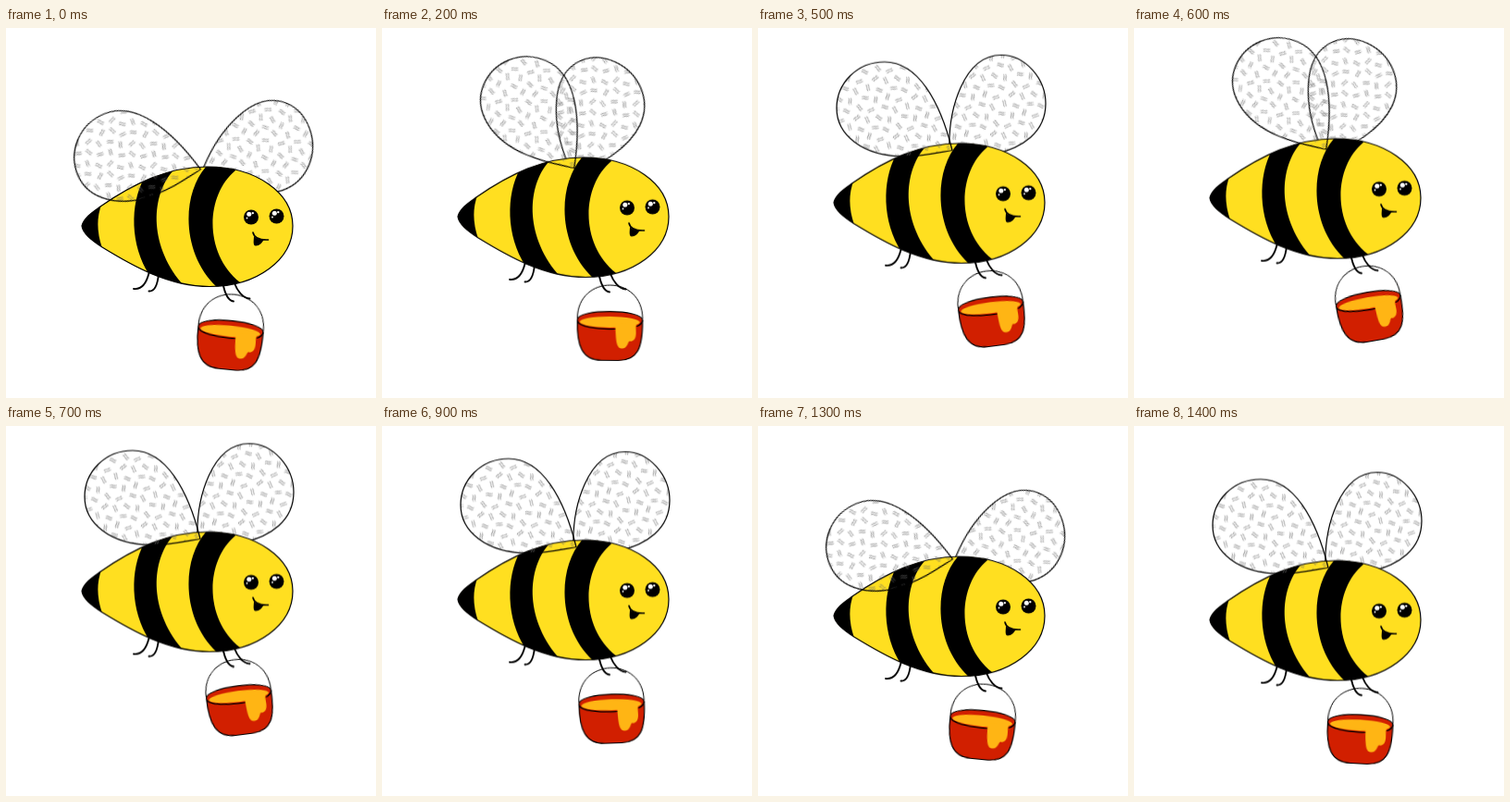
An HTML page without scripts for the animation above (1500 ms loop, 400 by 400 pixels).

```html
<!DOCTYPE html>
<html lang="en">
<head>
<meta charset="utf-8">
<title>Bee with a honey bucket</title>
<style>
  html, body { margin: 0; width: 100%; height: 100%; overflow: hidden; background: #fff; }
  svg { display: block; width: 100vw; height: 100vh; }
  .line { fill: none; stroke: #000; stroke-linecap: round; stroke-linejoin: round; }
  .thin { stroke-width: 1.2; }
  .bold { stroke-width: 1.9; }

  .bee, .wing, .bucket { animation: 1.5s infinite; }
  .bee { animation-name: hover; }
  .wing { --side: 1; animation-name: flap; animation-timing-function: step-end; }
  .wing.left { transform-origin: 198.5px 154px; }
  .wing.right { --side: -1; transform-origin: 216px 169px; }
  .bucket { animation-name: swing; transform-origin: 247px 288px; }

  @keyframes hover {
    0% { transform: translateY(0); animation-timing-function: steps(7); }
    46.66% { transform: translateY(-35.5px); animation-timing-function: steps(8); }
    100% { transform: translateY(0); }
  }
  @keyframes flap {
    0%, 26.66%, 53.33%, 80%, 86.66% { transform: rotate(calc(var(--side) * -22.6deg)); }
    6.66%, 20%, 33.33%, 46.66%, 60%, 73.33%, 93.33%, 100% { transform: rotate(0deg); }
    13.33%, 40%, 66.66% { transform: rotate(calc(var(--side) * 22.6deg)); }
  }
  @keyframes swing {
    0% { transform: rotate(5.7deg); animation-timing-function: steps(6); }
    40% { transform: rotate(-9.9deg); animation-timing-function: steps(6); }
    80% { transform: rotate(5.7deg); }
    86.66% { transform: rotate(5.7deg); animation-timing-function: steps(2); }
    100% { transform: rotate(.5deg); }
  }
</style>
</head>
<body>
<svg viewBox="0 0 400 400" role="img" aria-label="A bee carrying a bucket of honey">
  <defs>
    <path id="fleck" d="M-3.8-1.1q1.9-.9 3.8 0t3.8 0M-3.8 1.3q1.9-.9 3.8 0t3.8 0" fill="none" stroke="#666" stroke-width=".7"/>
    <pattern id="flecks" width="50" height="50" patternUnits="userSpaceOnUse" patternTransform="rotate(25) scale(.94)">
      <use href="#fleck" transform="translate(6 8) rotate(20)"/>
      <use href="#fleck" transform="translate(19 5) rotate(-55)"/>
      <use href="#fleck" transform="translate(31 9) rotate(5)"/>
      <use href="#fleck" transform="translate(43 6) rotate(60)"/>
      <use href="#fleck" transform="translate(8 20) rotate(-70)"/>
      <use href="#fleck" transform="translate(20 17) rotate(35)"/>
      <use href="#fleck" transform="translate(32 21) rotate(-35)"/>
      <use href="#fleck" transform="translate(44 18) rotate(-5)"/>
      <use href="#fleck" transform="translate(5 33) rotate(45)"/>
      <use href="#fleck" transform="translate(18 30) rotate(-10)"/>
      <use href="#fleck" transform="translate(30 33) rotate(75)"/>
      <use href="#fleck" transform="translate(43 31) rotate(-50)"/>
      <use href="#fleck" transform="translate(7 45) rotate(-25)"/>
      <use href="#fleck" transform="translate(19 42) rotate(65)"/>
      <use href="#fleck" transform="translate(32 45) rotate(-15)"/>
      <use href="#fleck" transform="translate(44 43) rotate(30)"/>
    </pattern>
    <path id="body" d="M82 214C84 205 95 198 102 193C138 168 175 150 218 150C270 150 310 178 310 214C310 250 272 279.5 220 279.5C175 279.5 135 256 104 237C92 229 83 222 82 214Z"/>
    <clipPath id="inside"><use href="#body"/></clipPath>
    <g id="eye">
      <circle r="8"/>
      <circle cx="-2.2" cy="-3.2" r="2.5" fill="#fff"/>
      <circle cx="1.8" cy="-4.4" r="1.2" fill="#fff"/>
      <circle cx="-4.5" cy="1" r=".9" fill="#fff"/>
    </g>
  </defs>

  <g class="bee">
    <path class="wing right line thin" style="fill:url(#flecks)" d="M207 160C205 112 223 54.5 263 54.5C289 54.5 311 80 311 107C311 138 286 155 255 162C238 166 220 165 207 160Z"/>

    <use href="#body" fill="#ffdf20"/>
    <g clip-path="url(#inside)">
      <path d="M80 190H103.5Q95 212 104 238H80Z"/>
      <path d="M149 163C134 190 134 235 155 267L190 278V276C153 232 158 180 180 155L179 150Z"/>
      <path d="M218 148C189 178 189 245 229 281H258L253 275C214.5 245 214.5 182 248 154V148Z"/>
    </g>
    <use href="#body" class="line thin"/>

    <use href="#eye" x="265" y="204.5"/>
    <use href="#eye" x="292.5" y="203.5"/>
    <path class="line" stroke-width="1.6" d="M267 221C268 226 272 229.5 283.5 229"/>
    <path d="M268 225C268 229 266.5 235.5 270 235.5C274 235.5 277 232 278.5 229Q271 229 268 225Z"/>

    <path class="wing left line thin" style="fill:url(#flecks)" d="M210 157.5C197 105 173 62 137 62C106 62 85 86 85 112C85 140 112 164 158 164C178 164 195 160 210 157.5Z"/>

    <g class="bucket">
      <path class="line" d="M211.5 324C211.5 276 282 276 282 324"/>
      <path class="line thin" style="fill:#d11f00" d="M211.5 326C211 354 217 369.5 238 369.5L256 369.5C277 369.5 282.5 356 282 326C282 313.5 211.5 313.5 211.5 326Z"/>
      <ellipse cx="246.5" cy="328" rx="32.5" ry="6" fill="#ffb514"/>
      <path class="line thin" d="M211.5 327C213 333 232 336.5 253 335.5M276 332.5Q281 330.5 282 326"/>
      <path fill="#ffb514" d="M252 330C254 340 252 356 259.5 356.5C266 357 266 350 268 348.5C273 349.5 275.5 345 275 338Q274 333 276 328Z"/>
    </g>

    <path class="line bold" d="M154.5 265C152 275 147 283 138 282M165 266C164 276 161 285 154.5 284.5M234 274C236 285 240 295 246 295.5M247 276C250 284 256 292 263.5 292.5"/>
  </g>
</svg>
</body>
</html>
```
